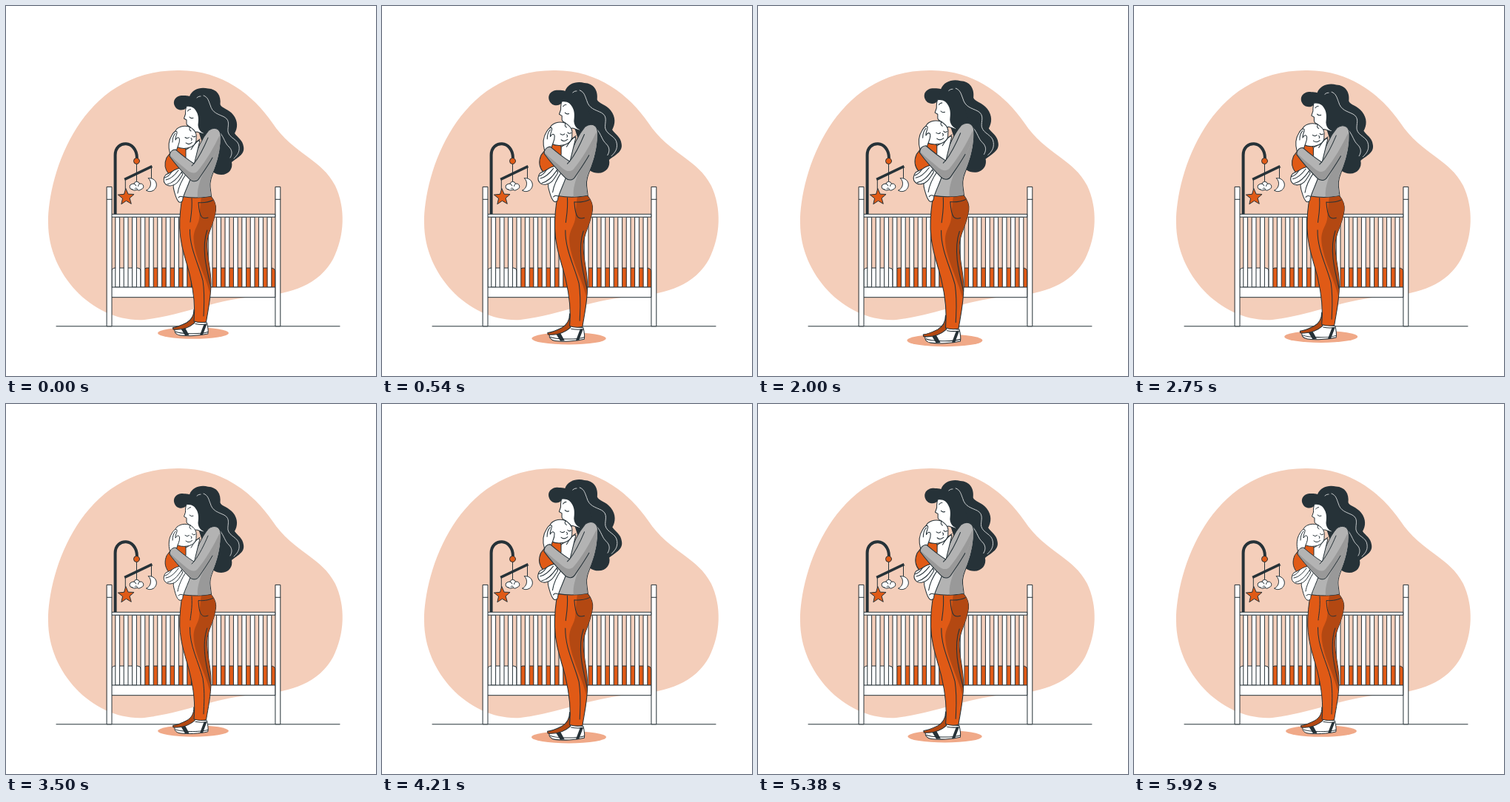
Recreate the animation shown at these times as an HTML page. Size 500 by 500 pixels, loop 5.96 s.

```html
<!DOCTYPE html>
<html lang="en">
<head>
<meta charset="utf-8">
<title>Mother and baby</title>
<style>
  html, body { margin: 0; width: 100%; height: 100%; overflow: hidden; background: #fff; }
  svg { display: block; width: 100vw; height: 100vh; }
  .line { fill: none; }
  .white { fill: #fff; }
  .orange { fill: #e05a16; }
  .rust { fill: #b34812; }
  .gray { fill: #b3b3b3; }
  .shade { fill: #999; }
  .dark { fill: #263238; }
  .plain { stroke: none; }
</style>
</head>
<body>
<svg viewBox="0 0 500 500" stroke="#263238" stroke-linecap="round" stroke-linejoin="round">
  <path class="plain" fill="#f4ceba" d="M232 87C291 86 334 120 360 158C389 201 426 206 445 243C459 273 458 310 442 342C423 377 384 389 345 392C286 395 244 417 187 424C120 428 57 365 57 293C57 225 102 87 232 87Z"/>
  <path class="line" d="M68 432.8H451"/>

  <g id="crib">
    <path class="white" d="M143 380V358Q143 354 148 354H178Q182 354 182 358V380Z"/>
    <path class="orange" d="M186 380V358Q186 354 190 354H358Q364 354 364 360V380Z"/>
    <g id="bars" class="white"></g>
    <path class="white" d="M143 281.3H364V285.2H143ZM143 380H364V393.7H143Z"/>
    <path class="white" d="M136.5 244.4H143V432.8H136.5ZM364.3 244.4H370.8V432.8H364.3Z"/>
    <path class="line" d="M136.5 261.3H143M364.3 261.3H370.8"/>
  </g>

  <g id="mobile">
    <path class="line" stroke-width="4" stroke-linecap="butt" d="M147.6 281V201.5C147.6 180.5 177 180.5 177 206"/>
    <path class="line" d="M176.5 213V237M161.3 234V248M196.5 218V233"/>
    <path class="line" stroke-width="3.4" stroke-linecap="butt" d="M160.2 234.4L197.4 216.6"/>
    <circle class="orange" cx="176.5" cy="209.5" r="4"/>
    <path id="star" class="orange"/>
    <path class="white" d="M170.5 248A3.7 3.7 0 0 1 170 240.7A3.8 3.8 0 0 1 172.8 240.3A4 4 0 0 1 180.5 240.3A3.9 3.9 0 1 1 182.5 247.8Q180 250.5 177 248.3Q173 250.5 170.5 248Z"/>
    <path class="line" d="M172.8 240.3Q175.5 240.5 175.8 243M180.5 240.3Q178.3 241 178.6 243.5M174 247Q175.5 244.5 177.5 247"/>
    <path class="white" d="M192.6 232.8A9 9 0 1 1 189.5 249.2A10 10 0 0 0 192.6 232.8Z"/>
  </g>

  <g id="figure">
    <ellipse class="plain" fill="#f0a988" cx="253" cy="442" rx="48" ry="7.8"/>

    <!-- shoes and trousers -->
    <path class="white" d="M226 436.5C232 435 247 429 254 426L271.5 428C273 434 273.5 440 272.8 443C262 445.5 245 446.5 235 445C229 444 227 440 228 437Z"/>
    <path class="plain dark" d="M236 435.5L241 433L247.5 444.8L242 445.3ZM262 444.6L267.5 430H271.4L266 444.3Z"/>
    <path class="line" d="M229 440C235 443 262 444 272.8 440.5M256 429.5Q263 431 271 430"/>
    <path class="rust" d="M254 410C254 418 251 424 244 428C238 431 231 434 225.5 434.5L226 437C236 438 247 435 255 428Z"/>
    <path class="orange" d="M238.5 257.5C236 270 234.5 285 234.8 300C235.5 324 243 342 248.5 364C253.5 385 256 406 254 426C260 428 265 428 270.5 427C273 411 277 394 277 375C277 353 271 338 271.5 321C272 306 281 295 283.5 276C284.5 268 281 262 277 257Z"/>
    <path class="plain rust" d="M277 258C282 263 284 269 283.3 276C281 295 272 306 271.3 321C271 338 276.5 353 276.7 373C276.5 378 276 384 275.5 388C270 365 254 337 253.5 314C254 299 261 297 261.5 283C262 273 263 264 264 258Z"/>
    <path class="line" d="M271.8 303C264 326 270 352 276.8 379M251 260C252 276 249.5 285 249 292M248.5 302C248 327 260 348 266 371C269 391 267.5 405 267 419"/>
    <path class="line" d="M279.5 262.5C273 265.5 266 266 260 265.5C260.5 273 261 281 264.5 285C267 287.5 270 287 273 286"/>

    <!-- hair and face -->
    <path class="plain dark" d="M244 137C241 142 231 142 228 135C224 126 232 120 240 121C243 121 246 121 248 122C252 112 263 109 273 111.5C285 112 291 121 289.5 133C291 138 301 139 307 147C314 156 313 165 309 172C313 178 320 181 321 190C323 200 314 204 305 211C307 220 301 228 291 228C283 228 277 224 275 216L261 172Z"/>
    <path class="white" d="M244 135C242.3 139 242.5 143 242.5 146L240.5 152L244 154L244 158C243.5 161 246 162 248 163C249 168 253 171 258 170L267 173L271 166C264 162 263 152 260 145C257 138 254 133 251 132Z"/>
    <path class="plain dark" d="M244 136C251 135 255 138 257.5 143C261 149 260 156 259.5 161C260 169 266 173 272 173L283 160L270 123L248 123Z"/>
    <path class="line" d="M248 150Q250 152.5 253 151.2M245.5 142Q247 139.5 249.5 139.5"/>
    <path class="line" stroke="#d7dadb" stroke-width=".9" d="M258 124C260 122 262 122 263 122M267 121C273 123 274 129 276 134C279 145 287 146 295 150C304 155 299 163 300 170C302 179 314 180 315 190C316 198 312 202 308 206M289 171C295 178 296 186 301 190C306 195 306 200 303 205"/>

    <!-- jumper -->
    <path class="gray" d="M274 168C281 163 289 165 290 174C291 190 287 207 282 220C278 230 275 237 276 245L277.5 257C265 259.5 250 259.5 238.5 257.5C241 247 246 240 245 228L253 209C258 196 263 181 274 168Z"/>
    <path class="plain shade" d="M289.5 174C290.5 190 286.5 207 281.5 220C277.5 230 274.5 237 275.5 245L277 256.8C271 258 265 258.5 259 258.6C258 249 261 240 264 231L283 197Z"/>

    <!-- baby -->
    <path class="white" d="M238 219C229 230 224 239 227 249C229 256 230 262 234 265C237 266 239 264 239 260C242 250 247 241 250 231L262 182C257 181 252 190 243 194Z"/>
    <path class="line" d="M244 226C237 236 233 246 232 253M239 258Q235 256 233 259M250 194Q256 184 262 180"/>
    <path class="orange" d="M231 187C235 187 241 190 243 194L243 204L239 217C232 220 226 226 220 227C214 220 214 212 217 205Z"/>
    <path class="white" d="M230 190C225 184 226 171 231 166C237 161 247 161 252 166C256 169 258 174 257 179C258 186 252 191 245 192C239 193 234 192 230 190Z"/>
    <path class="line" d="M242 177.5Q245 180 247.5 177.5M251.5 175.5Q253.5 178 256 176M243 185Q247 188.5 251.5 184.5M250 178.5Q252 180 250.5 181.5M249 163.5Q246.5 167 250 169"/>

    <!-- lower hand -->
    <path class="white" d="M238 219C233 219 228 221 224 224L216 228C213 231 212 237 215 240C219 245 227 243 231 239C234 236 236 232 238 229Q240 227 237 225Q240 222 238 219Z"/>
    <path class="line" d="M216 235C222 234 227 230 233 222M218 241C226 239 231 234 237 225M224 224C221 229 218 231 214.5 232"/>

    <!-- upper hand and arm -->
    <path class="white" d="M221.5 199C219 190 220 181 224 175C226 171 229 168 231 170C232 173 228 177 229 181C231 177 234 177 234.5 180C235 186 232 189 230.5 195Z"/>
    <path class="line" d="M225 184Q225 176 229 172"/>
    <path class="plain gray" d="M229 194C225 194 221 197 221 203C229 214 240 226 248 234C252 238 258 238 261 233C269 222 281 207 286 191C290 179 289 168 282 167C275 169 271 178 267 188L254 213C246 208 237 201 229 194Z"/>
    <path class="plain shade" d="M221 203C229 214 240 226 248 234C252 238 258 238 261 233C269 222 281 207 286 191C288 185 289 180 288.5 175C281 191 270 210 259 223C255 227 250 226 245 222C237 215 229 209 221 201Z"/>
    <path class="line" d="M273 178C268 190 261 204 254 213C246 208 237 201 229 194C225 194 221 197 221 203C229 214 240 226 248 234C252 238 258 238 261 233C267 224 274 214 279 205"/>
    <path class="line" d="M254 213L251 216"/>
  </g>
</svg>
<script>
  const LOOP = 5960, LEAD = 40;
  const PIVOT = [262.8, 279.8];
  // Pulse keys: time in ms, scale
  const PULSE = [[0, 1], [1200, 1.1], [3600, 1], [4800, 1.1], [6000, 1]];
  const figure = document.getElementById('figure');

  function pulseAt(t) {
    const i = PULSE.findIndex(([end], k) => k > 0 && t <= end);
    const [t0, s0] = PULSE[i - 1], [t1, s1] = PULSE[i];
    return s0 + (s1 - s0) * (t - t0) / (t1 - t0);
  }

  function starPath(cx, cy, outer, inner, turn) {
    const points = Array.from({ length: 10 }, (_, i) => {
      const r = i % 2 ? inner : outer, a = turn + i * Math.PI / 5;
      return `${cx + r * Math.sin(a)} ${cy - r * Math.cos(a)}`;
    });
    return `M${points.join('L')}Z`;
  }

  document.getElementById('star').setAttribute('d', starPath(162.3, 258.3, 11.4, 5, -0.03));
  document.getElementById('bars').innerHTML = Array.from({ length: 19 }, (_, i) =>
    `<rect x="${148.2 + i * 11.4}" y="285.2" width="5.4" height="94.8"/>`).join('');

  const base = pulseAt(LEAD);
  function draw() {
    const s = pulseAt(performance.now() % LOOP + LEAD) / base;
    const [x, y] = PIVOT;
    figure.setAttribute('transform', `translate(${x} ${y}) scale(${s}) translate(${-x} ${-y})`);
    requestAnimationFrame(draw);
  }
  draw();
</script>
</body>
</html>
```
